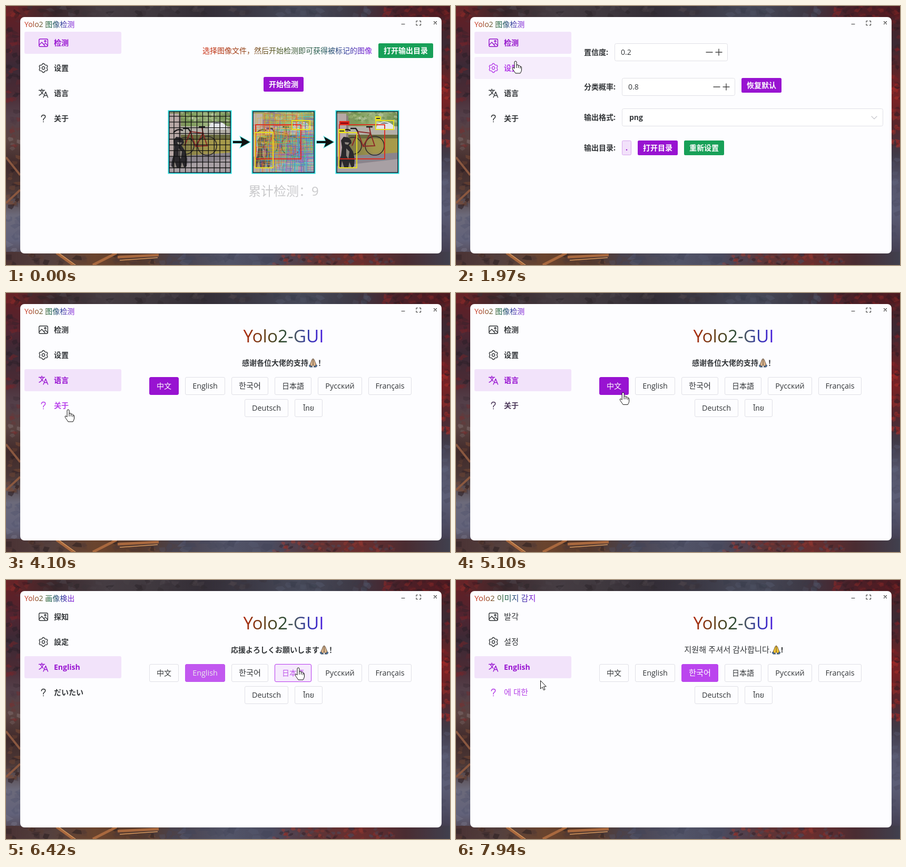
Animation of 843x493 px, one loop 8 s. Source, as an HTML page:

```html
<!DOCTYPE html>
<html lang="zh">
<head>
<meta charset="utf-8">
<title>Yolo2 GUI</title>
<style>
html, body { margin: 0; width: 100%; height: 100%; overflow: hidden; background: #3a2f3a; }
svg { display: block; width: 843px; height: 493px; }
text { font: 400 14px "Open Sans", "Noto Sans CJK SC", "Noto Sans Thai", "Noto Sans", sans-serif; fill: #333639; }
.b { font-weight: 700; }
.m { font-weight: 500; }
.mid { text-anchor: middle; }
.end { text-anchor: end; }
.line { fill: none; stroke: currentColor; stroke-width: 1.4; stroke-linecap: round; stroke-linejoin: round; }
</style>
</head>
<body>
<svg id="stage" viewBox="0 0 843 493"></svg>
<script>
const LOOP = 8000;
const PRIMARY = '#9813d1', HOVER = '#bb45ee', DARK = '#333639', PAPER = '#fdfdff';
const stage = document.getElementById('stage');

let seed = 11;
const rnd = () => (seed = (seed * 16807) % 2147483647) / 2147483647;
const span = (a, b) => a + (b - a) * rnd();
const pick = list => list[Math.floor(rnd() * list.length)];
const clamp = v => Math.max(0, Math.min(1, v));
const rgb = hex => [1, 3, 5].map(i => parseInt(hex.slice(i, i + 2), 16));
const blend = (a, b, p) => a.map((v, i) => Math.round(v + (b[i] - v) * p));
const css = c => `rgb(${c})`;

const rect = (x, y, w, h, fill, more = '') =>
  `<rect x="${x}" y="${y}" width="${w}" height="${h}" fill="${fill}" ${more}/>`;
const text = (x, y, s, more = '') => `<text x="${x}" y="${y}" ${more}>${s}</text>`;
const path = (d, more = '') => `<path d="${d}" ${more}/>`;
const gradient = (id, stops, more = '') => `<linearGradient id="${id}" ${more}>` +
  stops.map(([o, c]) => `<stop offset="${o}" stop-color="${c}"/>`).join('') + '</linearGradient>';

const hangul = s => /[가-힣]/.test(s);
const latin = s => /^[\x20-\u04ff]+$/.test(s);
const size = (s, bold) => hangul(s) ? '15.2px' : latin(s) && !bold ? '14.4px' : '14px';

// Painted autumn backdrop: smooth strips of colour under seeded brush dabs
function strip(id, x, y, w, h, ...colors) {
  const axis = h > w ? 'x2="0" y2="1"' : '';
  return gradient(id, colors.map((c, i) => [i / (colors.length - 1), c]), axis) + rect(x, y, w, h, `url(#${id})`);
}

function dabs(x, y, w, h, n, r, colors) {
  let out = '';
  for (let i = 0; i < n; i++) {
    const cx = span(x, x + w), cy = span(y, y + h);
    let d = '';
    for (let k = 0; k < 5; k++) {
      const a = (k + rnd() * .7) * 1.257, l = r * span(.4, 1.2);
      d += `${k ? 'L' : 'M'}${(cx + l * Math.cos(a)).toFixed(1)} ${(cy + l * Math.sin(a) * .7).toFixed(1)}`;
    }
    out += path(d + 'Z', `fill="${pick(colors)}" opacity="${span(.2, .6).toFixed(2)}"`);
  }
  return out;
}

function backdrop() {
  const red = ['#7a2026', '#8e2a28', '#2e1a22'];
  return rect(0, 0, 843, 493, '#3a323e') +
    strip('north', 0, 0, 843, 24, '#6a2428', '#3a282c', '#453c42', '#3f383e', '#332d36', '#3c3a46', '#474a5a', '#3e3a46', '#4a2028', '#521a20') +
    strip('west', 0, 20, 30, 473, '#5e2026', '#522430', '#3a2a36', '#4a2a34', '#54404a', '#5a4240', '#402a2a', '#4c3836', '#6c6a7a', '#62627a', '#4a3a40') +
    strip('east', 824, 20, 19, 473, '#4c2026', '#3c2a34', '#5c2428', '#7a2224', '#54262c', '#403a48', '#54546a', '#5c5e76', '#4e4c62', '#3c3442') +
    strip('south', 0, 468, 843, 25, '#4a3234', '#54403e', '#6a442e', '#54382c', '#4a4450', '#525468', '#4a4a5e', '#5c3436', '#6a2e2e', '#4a2c32', '#40404e') +
    '<g style="filter:blur(.6px)">' +
    dabs(0, 0, 40, 20, 14, 8, red) + dabs(40, 0, 460, 20, 50, 9, ['#2b2529', '#4c444a', '#3a3238']) +
    dabs(500, 0, 210, 20, 24, 10, ['#3a3d4c', '#525668']) + dabs(715, 0, 128, 22, 36, 8, red) +
    dabs(0, 20, 27, 200, 40, 8, ['#7a2428', '#2c2028', '#4a3440']) +
    dabs(0, 230, 27, 50, 10, 7, ['#8a7c7c', '#7a2c2c']) + dabs(0, 285, 27, 100, 18, 8, ['#2a1c20', '#7a4a34']) +
    dabs(0, 400, 27, 70, 12, 10, ['#7a788a', '#565870']) +
    dabs(826, 20, 17, 130, 24, 7, red) + dabs(826, 150, 17, 120, 28, 7, ['#a82824', '#b4342c', '#341c24']) +
    dabs(826, 290, 17, 180, 18, 9, ['#5e6078', '#4a4a60']) +
    dabs(0, 472, 290, 21, 34, 9, ['#2c2022', '#6e4630', '#4e3836']) +
    dabs(290, 472, 215, 21, 20, 12, ['#565a70', '#44465a']) +
    dabs(505, 472, 230, 21, 70, 6, ['#8a2e2a', '#a03a30', '#2e1e26', '#484a5c']) +
    path('M0 288L27 322M0 375L27 350', 'stroke="#8a5840" stroke-width="4"') +
    path('M96 470L128 493M165 493L210 470M212 478L290 474', 'stroke="#a8683e" stroke-width="5"') +
    path('M100 470L132 493M216 484L288 479', 'stroke="#d89a60" stroke-width="1.5"') + '</g>';
}

// Sample picture: a dog beside a bicycle on a porch
function photo() {
  return rect(0, 0, 120, 120, '#97918f') +
    strip('trees', 0, 0, 120, 36, '#8c8a6c', '#7c9a58', '#a4b886', '#6e8a4e') +
    dabs(24, 2, 92, 22, 60, 5, ['#5f8a3c', '#a8bc7c', '#d4d8c4', '#4c6e38']) +
    rect(0, 30, 120, 18, '#b4b0a8') + path('M76 36L80 25Q92 17 104 24L112 30V36Z', 'fill="#e4e6ea"') +
    path('M84 25Q92 20 101 25Z', 'fill="#6c7478"') +
    strip('wall', 24, 46, 96, 40, '#7c7848', '#a2964c', '#a89c4a') + rect(24, 46, 96, 7, '#6a6c40') +
    rect(0, 6, 20, 84, '#b8a8a6') + rect(20, 10, 4, 78, '#8c7e7c') +
    path('M0 88L120 80V120H0Z', 'fill="#8a848c"') + path('M0 106L120 92V120H0Z', 'fill="#a8a0a4"') +
    '<g fill="none" stroke="#2e2a2c" stroke-width="1.6"><circle cx="33" cy="67" r="16"/><circle cx="74" cy="67" r="18"/><circle cx="74" cy="67" r="15" stroke="#8a8060" stroke-width=".6"/></g>' +
    path('M31 67L42 40L66 43L52 68L42 40M52 68L74 67L66 43L64 32', 'fill="none" stroke="#8c2a28" stroke-width="2"') +
    path('M10 42Q18 33 28 38M58 31H70M42 40L38 34H28', 'fill="none" stroke="#1c1a1c" stroke-width="2.4"') +
    path('M10 57L15 50L23 51L29 56L30 62L25 66L33 78L36 92L35 106L30 109H10L6 106Q6 96 10 86L12 70Z', 'fill="#2a282c"') +
    path('M17 60L26 61L23 65L18 64ZM20 72L26 78L24 92L20 86ZM12 96L16 108H10ZM26 98L30 108H24Z', 'fill="#8d8680"');
}

function marks() {
  return '<g fill="none" stroke-width="1.8"><rect x="7" y="27" width="86" height="65" stroke="#e02a1c"/>' +
    '<path d="M6 42H40V109H6ZM76 19H110V36H76Z" stroke="#e8e020"/></g>';
}

function clutter() {
  let out = rect(0, 0, 120, 120, '#d8d0a8', 'opacity=".25"');
  for (let i = 0; i < 170; i++) {
    const x = Math.floor(span(1, 108)), y = Math.floor(span(1, 108)), hot = x + y < span(50, 160);
    const w = Math.min(span(5, 45), 117 - x).toFixed(0), h = Math.min(span(5, 45), 117 - y).toFixed(0);
    const color = pick(hot ? ['#e89030', '#e05838', '#d0b830', '#9050b8'] : ['#30c0c0', '#40b070', '#5078d0', '#a850b8', '#50d0d0']);
    out += rect(x + .5, y + .5, w, h, 'none', `stroke="${color}" stroke-width=".8" opacity=".8"`);
  }
  return out;
}

function thumbs() {
  let grid = '';
  for (let i = 1; i < 11; i++) grid += `M${i * 10.9} 0V120M0 ${i * 10.9}H120`;
  const extra = [
    path(grid, 'stroke="#111" stroke-width="1.3"'),
    clutter() + marks(),
    marks() + rect(7, 20, 19, 7, '#e02a1c') + rect(5, 35, 13, 7, '#e8e020') + rect(75, 11, 11, 8, '#e8e020') +
      '<path d="M9 24H24" stroke="#701" stroke-width="2"/><path d="M7 39H16M77 15H84" stroke="#333" stroke-width="2"/>'
  ];
  const shot = photo();
  const arrow = 'M0 -2H17L14 -10L32 0L14 10L17 2H0Z';
  return extra.map((e, i) => `<g transform="translate(${308 + 159 * i} 199)"><svg width="120" height="120">${shot}${e}</svg>` +
    rect(.5, .5, 119, 119, 'none', 'stroke="#25dfe0" stroke-width="2"') +
    rect(2, 2, 116, 116, 'none', 'stroke="#123" stroke-width="1.4"') + '</g>').join('') +
    [431, 590].map(x => `<g transform="translate(${x} 259)">` +
      path(arrow, 'fill="#111" stroke="#55e6e6" stroke-width="2" paint-order="stroke"') + '</g>').join('');
}

const solid = (x, y, w, s, fill) => rect(x, y, w, 28, fill, 'rx="2.5"') +
  text(x + w / 2, y + 19, s, 'class="mid b" style="fill:#fff"');
const field = (x, y, w) => rect(x + .5, y + .5, w - 1, 33, '#fff', 'rx="3" stroke="#e0e0e6"');
const stepper = (x, y, s) => field(x, y, 215) + text(x + 12, y + 22, s) +
  path(`M${x + 174} ${y + 17}h12m6 0h12m-6 -6v12`, 'class="line" color="#444"');

const detectPage = () => text(373, 90, '选择图像文件，然后开始检测即可获得被标记的图像', 'style="fill:url(#wide)"') +
  solid(707, 71, 104, '打开输出目录', '#18a058') + solid(489, 135, 76, '开始检测', PRIMARY) + thumbs() +
  text(527, 361, '累计检测：9', 'class="mid" style="font-size:24px;fill:#c9c9cb"');

const settingsPage = () => text(243, 93, '置信度:', 'class="b"') + stepper(301, 71, '0.2') +
  text(243, 159, '分类概率:', 'class="b"') + stepper(315, 137, '0.8') + solid(542, 137, 76, '恢复默认', PRIMARY) +
  text(243, 217, '输出格式:', 'class="b"') + field(315, 195, 496) + text(329, 217, 'png', 'class="b"') +
  path('M789 210l5 5l5 -5', 'class="line" color="#c4c4ca" style="stroke-width:1.1"') +
  text(243, 275, '输出目录:', 'class="b"') +
  rect(315.5, 256.5, 17, 27, '#f2e1fa', 'rx="2" stroke="#d8a6ee"') +
  text(324, 275, '.', `class="mid b" style="fill:${PRIMARY}"`) +
  solid(345, 256, 76, '打开目录', PRIMARY) + solid(433, 256, 76, '重新设置', '#18a058');

const BUTTONS = [
  ['中文', 272, 160, 56], ['English', 340, 160, 76], ['한국어', 428, 160, 70], ['日本語', 510, 160, 70],
  ['Русский', 592, 160, 84], ['Français', 688, 160, 82], ['Deutsch', 453, 202, 83], ['ไทย', 548, 202, 53]
];
const langPage = () => text(527, 94, 'Yolo2-GUI', 'class="mid" style="font-size:33.3px;fill:url(#head)"') +
  '<text id="thanks" class="end" y="138"></text><text id="bang" class="b" y="138"></text>' +
  '<g id="hands">' + path('M-4 3L-8 5L-6 8L-1 8ZM4 3L8 5L6 8L1 8Z', 'fill="#4a78a8" stroke="#2c3c50" stroke-width=".8"') +
  path('M0 -8C3 -7 3 -2 6 3L3 7L0 4L-3 7L-6 3C-3 -2 -3 -7 0 -8ZM0 -7V4', 'id="palms" stroke="#4a3a30" stroke-width=".9"') + '</g>' +
  BUTTONS.map(([s, x, y, w], i) => `<g id="btn${i}">` +
    rect(x, y, w, 34, 'none', `rx="3" stroke="${HOVER}"`) +
    rect(x + .5, y + .5, w - 1, 33, PAPER, 'rx="2.5"') +
    text(x + w / 2, y + 22, s, `class="mid" style="font-size:${size(s)}"`) + '</g>').join('');

function gear() {
  let d = '';
  for (let i = 0; i < 24; i++) {
    const a = (i + .5) * Math.PI / 12, r = i % 4 < 2 ? 8.6 : 6.8;
    d += `${i ? 'L' : 'M'}${(r * Math.sin(a)).toFixed(1)} ${(-r * Math.cos(a)).toFixed(1)}`;
  }
  return path(d + 'Z', 'transform="rotate(-15)"') + '<circle r="2.7"/>';
}
const ICONS = [
  rect(-8.3, -7.3, 16.6, 14.6, 'none', 'rx="2.5"') + '<circle cx="3.5" cy="-3" r="1.5"/>' + path('M-8 4L-3 -1L3 6M1 3L4 1L8 5'),
  gear(),
  path('M-8.5 -5.5H2.5M-3 -8V-5.5M0 -5.5Q-2 1 -8 4M-6 -5.5Q-3 0 0 2M0 8L4.3 -2.5L8.5 8M1.6 4.5H7'),
  path('M-3.6 -3Q-3.2 -6.5 0 -6.5Q3.8 -6.3 3.6 -3Q3.4 -1 .8 .6Q0 1.2 0 3M0 6.2V6.4', 'style="stroke-width:1.7"')
];

const LANGS = {
  zh: ['Yolo2 图像检测', ['检测', '设置', '语言', '关于'], '感谢各位大佬的支持', 583, '！'],
  en: ['Yolo2 Image Detection', ['Detection', 'Seting', 'Language', 'About'], 'Thank you all for your support', 632, '!'],
  ja: ['Yolo2 画像検出', ['探知', '設定', 'English', 'だいたい'], '応援よろしくお願いします', 604, '！'],
  ko: ['Yolo2 이미지 감지', ['발각', '설정', 'English', '에 대한'], '지원해 주셔서 감사합니다.', 608, '!']
};

stage.innerHTML = '<defs>' +
  gradient('title', [[0, '#d0301c'], [.25, '#8c4a20'], [.5, '#1c6840'], [.75, '#303c9c'], [1, '#8c18e0']]) +
  gradient('wide', [[0, '#cc2c10'], [.2, '#a03c14'], [.45, '#4e5a24'], [.7, '#1f5a50'], [.85, '#303c9c'], [1, '#8418e0']]) +
  gradient('head', [[0, '#b02c10'], [.3, '#5c4018'], [.5, '#2c4a30'], [.65, '#4a5664'], [.8, '#3038a8'], [1, '#4a1ce0']]) +
  '</defs>' + backdrop() + rect(27, 21, 800, 450, PAPER, 'rx="8"') +
  '<text id="caption" x="35" y="40" style="fill:url(#title)"></text>' +
  path('M751 34.5h6M812.5 29.5l5 5m0 -5l-5 5M779 31v-2.5h2.5M785 28.5h2.5v2.5M787.5 34v2.5h-2.5M781.5 36.5h-2.5v-2.5',
    'class="line" color="#333" style="stroke-width:1.1"') +
  ICONS.map((icon, i) => `<g id="item${i}">` + rect(35, 49 + 48 * i, 184, 42, PRIMARY, 'rx="3"') +
    `<g class="line" transform="translate(71 ${70 + 48 * i})">${icon}</g>` +
    `<text x="91" y="${75 + 48 * i}"></text></g>`).join('') +
  [detectPage, settingsPage, langPage].map((page, i) => `<g id="page${i}">${page()}</g>`).join('') +
  '<g id="cursor">' +
  path('M.5 .5V16.2L4 12.7L6.5 18.5L9 17.5L6.5 11.8H11.3Z', 'id="arrow" fill="#fff" stroke="#111"') +
  path('M-2 14V2Q-2 0 0 0Q2 0 2 2V8Q2.5 6.5 4 6.8Q5.6 7 5.6 9Q6.5 7.8 7.6 8.3Q9 8.8 9 10.5Q11.5 9.5 11.5 12V17Q11 20 9 23H0Q-2 20 -4.5 16.5Q-7 13.2 -5.5 12.2Q-4.2 11.5 -2 14ZM2 8V13M5.6 9V13M9 10.5V14',
    'id="hand" fill="#fff" stroke="#111" stroke-linejoin="round"') + '</g>';

const $ = id => document.getElementById(id);
const show = (el, on) => el.setAttribute('display', on ? 'inline' : 'none');
function write(el, s, bold) {
  el.textContent = s;
  el.style.fontSize = size(s, bold);
  el.style.fontWeight = !bold ? 400 : hangul(s) ? 500 : 700;
}

// Pointer route: time, x, y
const ROUTE = [
  [710, 417, 476], [1100, 215, 300], [1500, 118, 116], [1700, 113, 105], [3570, 113, 105],
  [3720, 116, 165], [3800, 116, 165], [4060, 118, 222], [4760, 118, 222], [5200, 375, 180],
  [5310, 380, 178], [5500, 424, 172], [5950, 612, 180], [6150, 615, 178], [6350, 555, 167],
  [6480, 555, 167], [6820, 462, 180], [6910, 450, 182], [7020, 370, 218], [7150, 240, 256],
  [7280, 150, 241], [7420, 146, 226], [7940, 160, 191]
];
const MENU_CLICKS = [[-999, 0], [1910, 1], [3760, 2]];
const LANG_CLICKS = [[-999, 0, 'zh'], [5310, 1, 'en'], [6405, 3, 'ja'], [6920, 2, 'ko']];
const current = (list, t) => list.filter(c => c[0] <= t).pop();

function pointer(t) {
  if (t < ROUTE[0][0]) return [-99, -99];
  const i = ROUTE.findIndex(k => k[0] > t);
  if (i < 0) return ROUTE[ROUTE.length - 1].slice(1);
  const [a, b] = [ROUTE[i - 1], ROUTE[i]], p = (t - a[0]) / (b[0] - a[0]);
  return [a[1] + (b[1] - a[1]) * p, a[2] + (b[2] - a[2]) * p];
}
const over = (t, x, y, w, h) => {
  const [px, py] = pointer(t);
  return px >= x && px <= x + w && py >= y && py <= y + h;
};
// Eased share of the last 200 ms spent inside the box
function hover(t, ...box) {
  let n = 0;
  for (let k = 0; k < 10; k++) n += over(t - k * 20, ...box);
  return 1 - (1 - n / 10) ** 2;
}
// Time since item i was chosen and since it was replaced
function ages(list, i, t) {
  const k = list.findIndex(c => c[1] === i);
  if (k < 0) return [-1, -1];
  return [t - list[k][0], list[k + 1] ? t - list[k + 1][0] : -1];
}

function drawMenu(t, labels) {
  let hand = false;
  for (let i = 0; i < 4; i++) {
    const box = [35, 49 + 48 * i, 184, 42], [on, off] = ages(MENU_CLICKS, i, t);
    const left = 1 - clamp(off / 300) ** 2;
    const tint = blend(blend(rgb(DARK), rgb(HOVER), hover(t, ...box)), rgb(PRIMARY), clamp(on / 300) * left);
    const [bg, icon, label] = $('item' + i).children;
    bg.setAttribute('opacity', .11 * clamp(on / 100) * left);
    icon.setAttribute('color', css(tint));
    label.style.fill = css(tint);
    write(label, labels[i], true);
    hand = hand || over(t, ...box);
  }
  return hand;
}

function drawButtons(t) {
  let hand = false;
  BUTTONS.forEach(([, x, y, w], i) => {
    const [on, off] = ages(LANG_CLICKS, i, t), h = hover(t, x, y, w, 34);
    const ease = a => 1 - (1 - clamp(a / 300)) ** 2;
    const s = ease(on) * (1 - ease(off));
    const base = rgb(i ? HOVER : PRIMARY);
    const [ring, face, label] = $('btn' + i).children;
    const edge = blend(rgb('#e0e0e6'), rgb(HOVER), h);
    face.setAttribute('fill', css(blend(rgb(PAPER), base, s)));
    face.setAttribute('stroke', css(blend(edge, base, on >= 0 && off < 0 ? 1 : s)));
    label.style.fill = css(blend(blend(rgb(DARK), rgb(HOVER), h), [255, 255, 255], s));
    ring.setAttribute('stroke-width', 8 * clamp(on / 300));
    ring.setAttribute('stroke-opacity', on >= 0 ? .5 * (1 - clamp(on / 700)) : 0);
    hand = hand || over(t, x, y, w, 34);
  });
  return hand;
}

function draw(t) {
  const page = current(MENU_CLICKS, t)[1], lang = current(LANG_CLICKS, t)[2];
  const [title, labels, thanks, hx, bang] = LANGS[lang];
  for (let i = 0; i < 3; i++) show($('page' + i), i === page);
  write($('caption'), title, false);
  write($('thanks'), thanks, true);
  $('thanks').setAttribute('x', hx - 9);
  $('bang').textContent = bang;
  $('bang').setAttribute('x', hx + 9);
  $('hands').setAttribute('transform', `translate(${hx} 133)`);
  $('palms').setAttribute('fill', lang === 'ko' ? '#f2c434' : '#d8b48c');

  const onMenu = drawMenu(t, labels), onButton = drawButtons(t) && page === 2;
  const [x, y] = pointer(t), hand = onMenu || onButton;
  $('cursor').setAttribute('transform', `translate(${x.toFixed(1)} ${y.toFixed(1)})`);
  show($('cursor'), x > 0);
  show($('hand'), hand);
  show($('arrow'), !hand);
}

const start = performance.now();
function tick() {
  draw((performance.now() - start) % LOOP);
  requestAnimationFrame(tick);
}
tick();
</script>
</body>
</html>
```
